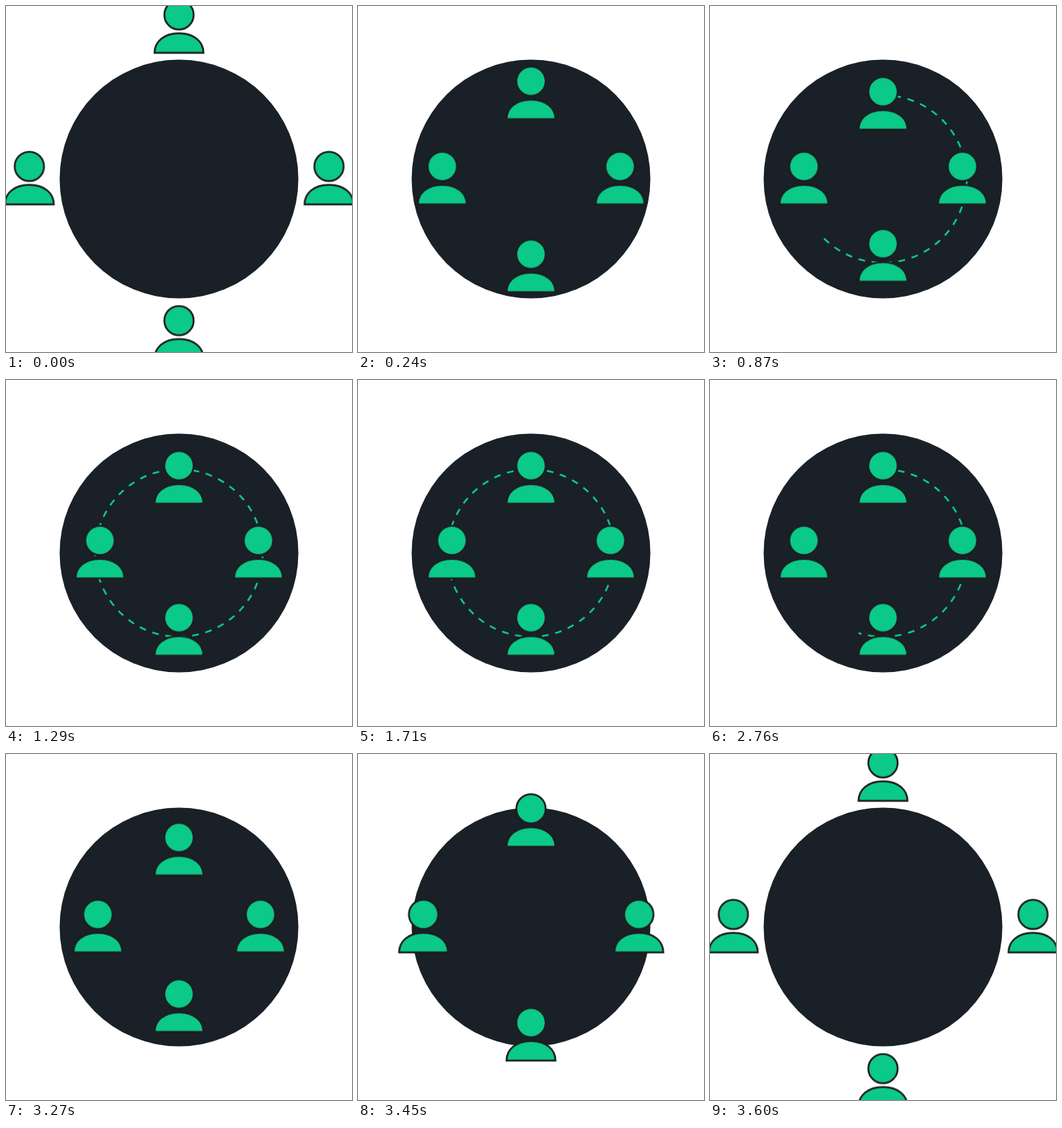
Write an HTML page without scripts that moves like this. It is 500 by 500 pixels and loops after 3.63 s.

```html
<!DOCTYPE html>
<html lang="en">
<head>
<meta charset="utf-8">
<title>Connected people</title>
<style>
  html, body { margin: 0; width: 100%; height: 100%; overflow: hidden; background: #fff; }
  svg { display: block; width: 100vw; height: 100vh; }

  .disc { fill: #1a2027; }
  .person { fill: #0bc988; stroke: #1d1e1f; stroke-width: 2.7; animation: gather 3.63s infinite; }
  .top    { --rest: translate(250px, 123.8px);   --away: translate(250px, 12.8px); }
  .bottom { --rest: translate(250px, 343.5px);   --away: translate(250px, 454.6px); }
  .left   { --rest: translate(135.7px, 231.8px); --away: translate(33.7px, 231.8px); }
  .right  { --rest: translate(364.8px, 231.8px); --away: translate(466.7px, 231.8px); }

  .dashes, .reveal { fill: none; }
  .dashes {
    stroke: #0bc988; stroke-width: 2.6; stroke-dasharray: 9.7 9.79;
    animation: drift 3.63s linear infinite;
  }
  .reveal {
    stroke: #fff; stroke-width: 8; stroke-dasharray: 100 200;
    animation: draw 3.63s infinite;
  }

  @keyframes gather {
    0% { transform: var(--away); animation-timing-function: cubic-bezier(0, 0, .527, 1); }
    9.917% { transform: var(--rest); }
    88.43% { transform: var(--rest); animation-timing-function: cubic-bezier(.518, 0, 1, 1); }
    99.174%, 100% { transform: var(--away); }
  }
  @keyframes drift {
    from { stroke-dashoffset: -49.9; }
    to { stroke-dashoffset: 89.7; }
  }
  @keyframes draw {
    0%, 9.917% { stroke-dashoffset: 100.2; animation-timing-function: cubic-bezier(.333, 0, .667, 1); }
    33.884%, 64.463% { stroke-dashoffset: 0; animation-timing-function: cubic-bezier(.333, 0, .667, 1); }
    89.256%, 100% { stroke-dashoffset: 100.2; }
  }
</style>
</head>
<body>
<svg viewBox="0 0 500 500">
  <defs>
    <g id="figure">
      <circle r="21.2"/>
      <path d="M-35.3 54.8C-35.3 39 -22 26.7 0 26.7S35.3 39 35.3 54.8Z"/>
    </g>
    <mask id="drawn" maskUnits="userSpaceOnUse" x="-250" y="-250" width="500" height="500">
      <circle class="reveal" r="121" pathLength="100"/>
    </mask>
  </defs>

  <circle class="disc" cx="250" cy="250" r="172.5"/>
  <!-- Rotated so that the ring starts at the top -->
  <g transform="translate(250 250) rotate(-90)">
    <g mask="url(#drawn)"><circle class="dashes" r="121"/></g>
  </g>
  <g class="person top"><use href="#figure"/></g>
  <g class="person right"><use href="#figure"/></g>
  <g class="person bottom"><use href="#figure"/></g>
  <g class="person left"><use href="#figure"/></g>
</svg>
</body>
</html>
```
